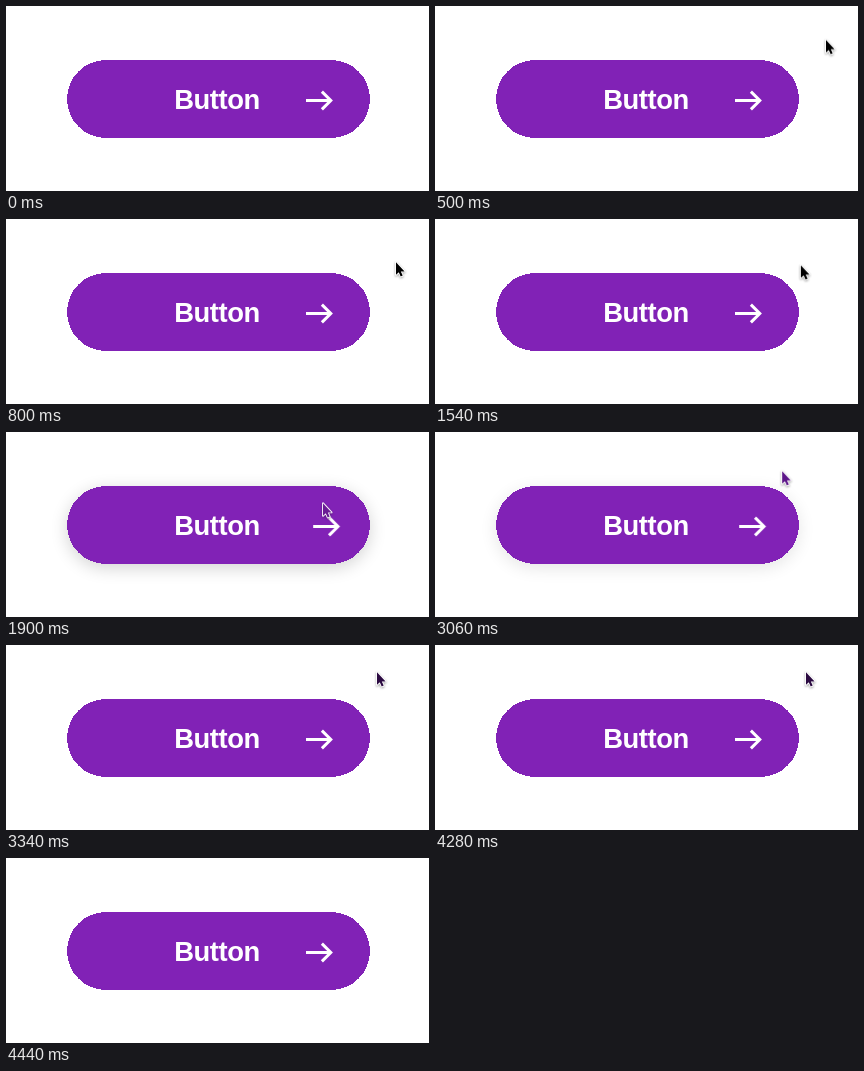
These frames come from a looping animation (423x185 px, 4880 ms). An HTML page:

```html
<!DOCTYPE html>
<html lang="en">
<head>
<meta charset="utf-8">
<title>Button hover</title>
<style>
html, body { margin: 0; width: 100%; height: 100%; overflow: hidden; background: #fff; }
svg { display: block; width: 100%; height: 100%; }
text { font: bold 27.4px "Liberation Sans", Arial, sans-serif; letter-spacing: -.45px; text-anchor: middle; fill: #fff; }
#shadow { filter: blur(8.5px); opacity: 0; }
#face { fill: #8122b6; shape-rendering: crispEdges; }
#arrow { fill: none; stroke: #fff; stroke-width: 3; }
#cursor { opacity: 0; filter: drop-shadow(.5px 1.2px 1px rgba(0, 0, 0, .35)); }
#pointer { fill: #000; stroke: #fff; stroke-width: 1.8; paint-order: stroke; stroke-linejoin: round; }
</style>
</head>
<body>
<svg viewBox="0 0 423 185">
  <rect id="shadow" x="61" y="58" width="303" height="78" rx="39"/>
  <rect id="face" x="61" y="54" width="303" height="78" rx="39"/>
  <text x="211" y="103">Button</text>
  <path id="arrow" d="M300 94.5H325M315.9 85.6L324.8 94.5L315.9 103.4"/>
  <g id="cursor">
    <path id="pointer" d="M0 .2V12.8L2.8 10.2L4.7 14.5L6.7 13.6L4.8 9.4H8.6Z"/>
  </g>
</svg>
<script>
const LOOP = 4880;

// Each step is [time in ms, value, easing towards the next step].
function play(id, prop, steps) {
  const frames = steps.map(([t, value, easing = 'linear']) =>
    ({ offset: t / LOOP, [prop]: value, easing }));
  document.getElementById(id).animate(frames, { duration: LOOP, iterations: Infinity });
}

// Value goes from rest to active on hover and back again.
const hover = (rest, active) => [
  [0, rest], [1640, rest, 'ease'], [1960, active],
  [2980, active, 'ease'], [3290, rest], [LOOP, rest]
];

const at = (x, y) => `translate(${x}px, ${y}px)`;

play('arrow', 'transform', hover(at(0, 0), at(7.3, 0)));
play('shadow', 'opacity', hover(0, 0.18));

play('cursor', 'transform', [
  [0, at(394, 5)],
  [280, at(394, 5), 'cubic-bezier(.25,.5,.4,1)'],
  [800, at(390, 43)],
  [1380, at(390, 43), 'cubic-bezier(.5,0,.8,.8)'],
  [1540, at(366, 46)],
  [1700, at(338, 58), 'ease-out'],
  [1900, at(317, 71), 'ease-out'],
  [2240, at(309, 78)],
  [2920, at(309, 78), 'ease-in'],
  [2980, at(329, 56)],
  [3060, at(347, 39), 'ease-out'],
  [3340, at(371, 27)],
  [4280, at(371, 27), 'ease-in'],
  [4440, at(390, 1)],
  [LOOP, at(394, 5)]
]);

play('cursor', 'opacity', [
  [0, 0], [280, 0], [280, 1], [4440, 1], [4440, 0], [LOOP, 0]
]);

play('pointer', 'fill', [
  [0, '#000'], [1640, '#000'], [1760, '#6a1c94'], [2940, '#6a1c94'],
  [3060, '#5c1688'], [3340, '#2c0b42'], [LOOP, '#2c0b42']
]);
</script>
</body>
</html>
```
